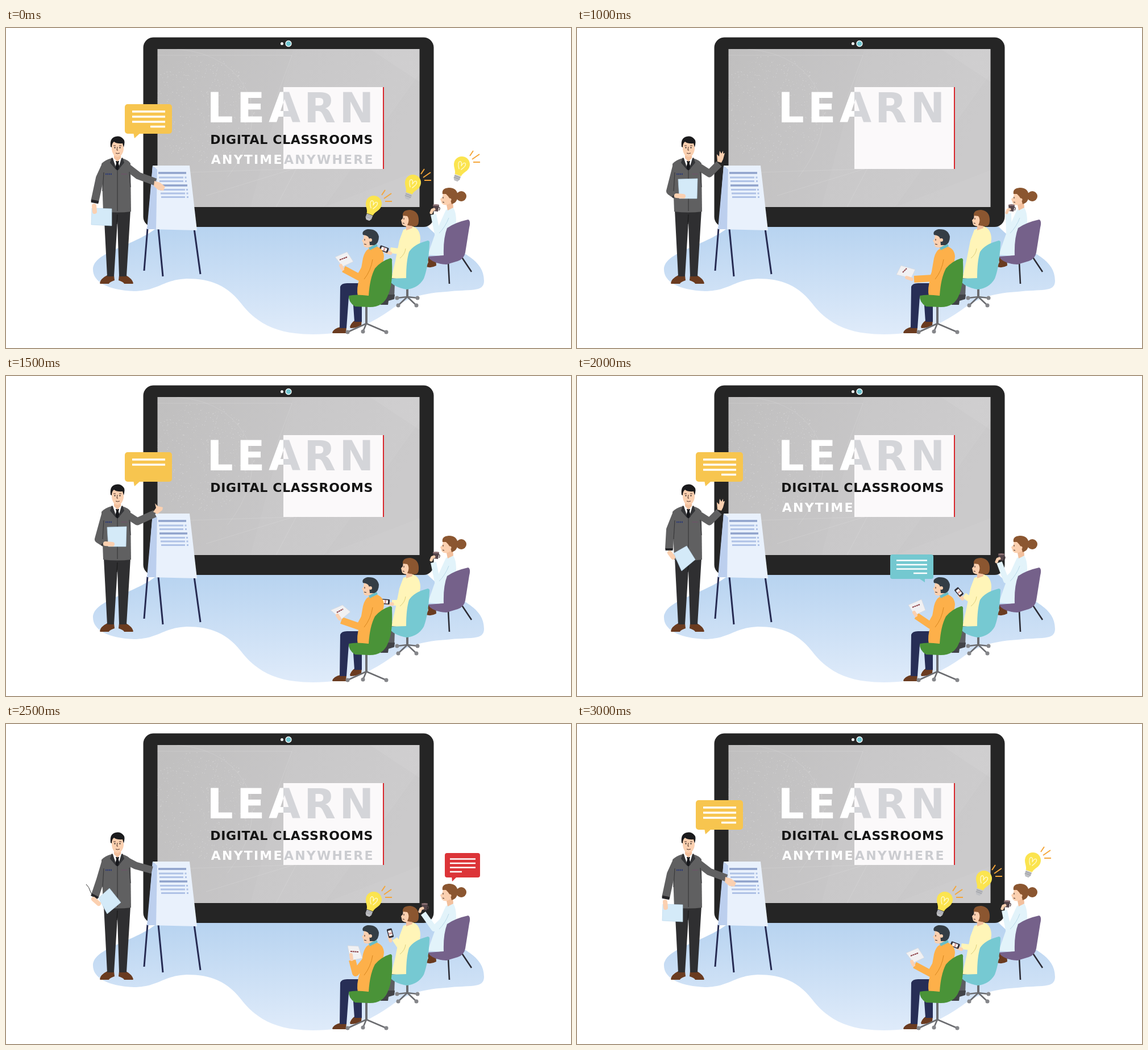
An HTML page for the animation above (3.5 s loop, 994 by 563 pixels).

```html
<!DOCTYPE html>
<html lang="en">
<head>
<meta charset="utf-8">
<title>Digital classrooms</title>
<style>
html, body { margin: 0; width: 100%; height: 100%; overflow: hidden; background: #fff }
svg { display: block }
text { font-family: "DejaVu Sans", Verdana, sans-serif; font-weight: 700 }
.line { fill: none; stroke-linejoin: round }
.round { stroke-linecap: round }
.skin { stroke: #fbd0b0 }
</style>
</head>
<body>
<svg width="994" height="563" viewBox="0 0 994 563">
<defs>
  <linearGradient id="floor" x2="0" y2="1"><stop stop-color="#b7d3f0"/><stop offset="1" stop-color="#dfebfa"/></linearGradient>
  <linearGradient id="wall" x2="1" y2=".25"><stop stop-color="#c0bfbf"/><stop offset=".55" stop-color="#c7c6c7"/><stop offset="1" stop-color="#cbcacb"/></linearGradient>
  <clipPath id="screen"><path d="M266.500 37H727.500V315H266.500Z"/></clipPath>
  <clipPath id="west"><path d="M266 37H488V315H266Z"/></clipPath>
  <clipPath id="east"><path d="M488 37H728V315H488Z"/></clipPath>
  <text id="learn" x="353.600" y="166" font-size="72.500" letter-spacing="6.300">LEARN</text>
  <g id="bulb">
    <g transform="rotate(20)">
      <path d="M-6 20C-6 13 -14 9 -14 0A14 14 0 0 1 14 0C14 9 6 13 6 20Z" fill="#fbe44f"/>
      <path class="line round" d="M-2 9Q-9 -1 -5 -4Q-1 -5 0 3Q1 -5 5 -4Q9 -1 2 9" stroke="#fffbd0" stroke-width="1.3"/>
      <path d="M-5.500 20.500H5.500V27L3 31H-3L-5.500 27Z" fill="#bfc0c4"/>
      <path d="M-5.500 23H5.500M-5.500 26H5.500" stroke="#96989d" stroke-width=".9"/>
    </g>
    <path class="line" d="M14 -15L20 -24M18 -9L31 -18M20 -4L32 -4" stroke="#f5a63a" stroke-width="2"/>
  </g>
</defs>

<path fill="url(#floor)" d="M153 425C153 393 225 385 270 348H740C785 395 841 399 841 445C841 466 815 459 775 464C725 467 702 478 678 495C650 514 615 539 540 539C480 539 445 522 418 490C390 452 360 441 318 441C275 443 270 462 225 463C178 461 153 446 153 425Z"/>

<!-- tablet -->
<rect x="241.500" y="16.500" width="511" height="333.500" rx="18" fill="#252525"/>
<circle cx="485.500" cy="27.500" r="2.500" fill="#fff"/>
<circle cx="497" cy="27.500" r="5" fill="#6fc5d0" stroke="#fff" stroke-width="1.300"/>
<g clip-path="url(#screen)">
  <path d="M266 37H728V315H266Z" fill="url(#wall)"/>
  <path d="M505 37H728V80L560 315H430L480 130Z" fill="#fff" opacity=".03"/>
  <path d="M640 37L728 95V37Z" fill="#fff" opacity=".05"/>
  <path d="M560 315L728 250V315Z" fill="#fff" opacity=".04"/>
  <g id="globe" fill="#fff" opacity=".3"></g>
  <path class="line" d="M266 48H503L476 122M290 255L507 248M352 295L590 222M475 315L512 245M300 37Q400 45 430 125Q445 190 390 262" stroke="#fff" stroke-width=".8" opacity=".16"/>
</g>
<path d="M488 104H664V248H488Z" fill="#fbf9fa"/>
<path d="M664 104V248" stroke="#d9272d" stroke-width="2"/>
<use href="#learn" fill="#fff" clip-path="url(#west)"/>
<use href="#learn" fill="#d4d5d9" clip-path="url(#east)"/>
<text data-on="0234" x="359.200" y="203.500" font-size="22" letter-spacing=".68" fill="#141414">DIGITAL CLASSROOMS</text>
<g font-size="22" letter-spacing="2.200">
  <text data-on="034" x="360.800" y="239" fill="#fff">ANYTIME</text>
  <text data-on="04" x="489" y="239" fill="#cbccd0">ANYWHERE</text>
</g>

<!-- flip chart -->
<path class="line" d="M249 353L243 427M268 353L276 437M331 353L342 433" stroke="#262b52" stroke-width="3"/>
<path d="M258 242H323L336 356L249 354Z" fill="#e9f1fc"/>
<path d="M258 242L266 249L264 354L248 354Z" fill="#bccfee"/>
<path d="M268 255H317M270 277H319" stroke="#8fa2cb" stroke-width="3.400"/>
<path d="M269 263H312M314.500 263H317.500M270 269.500H312M315 269.500H318M271 284.500H315M317 284.500H320M272 291H315M317.500 291H320.500M273 297.500H315M318 297.500H321" stroke="#afc2e6" stroke-width="3"/>

<!-- presenter -->
<path d="M165 449Q166 441 178 435H190L191 444Q182 447 181 450H166ZM224 449Q222 441 211 435H199L198 444Q207 447 208 450H223Z" fill="#6a3b20"/>
<path d="M172 320H219L212 437H199L196 340L190 437H178Z" fill="#2f2f31"/>
<path d="M196 328L195 345" stroke="#151515"/>
<path class="line" data-d="armL" stroke="#606061" stroke-width="14"/>
<path class="line" data-d="cuffL" stroke="#252528" stroke-width="13"/>
<path class="line" data-d="armR" stroke="#606061" stroke-width="13"/>
<path d="M186 229H204Q215 232 219 238L220 323Q196 326 171 323L168 239Q174 232 186 229Z" fill="#606061"/>
<path class="line" d="M172 254L170 287M217 253L219 280M196 248V322" stroke="#39393b" stroke-width="1.200"/>
<path d="M187 228L196 251L205 228Z" fill="#fff"/>
<path d="M193 234H199L198 238L200 247L196 251L192 247L194 238Z" fill="#17181c"/>
<path d="M186 228L183 237L194 250L188 229ZM205 228L208 237L197 250L203 229Z" fill="#333437"/>
<path d="M175 257H186" stroke="#2d3b75" stroke-width="2.500" stroke-dasharray="2 1"/>
<path d="M203 257H213" stroke="#6d5268" stroke-width="2" stroke-dasharray="2 1"/>
<path d="M190 218H202V229L196 235L190 229Z" fill="#f3c09d"/>
<path d="M186 202Q196 195 206 202L207 213Q206 225 196 227Q187 225 186 213Z" fill="#fbd0b0"/>
<path d="M184 209Q182 193 193 191Q201 189 207 196Q210 199 207 210L205 203Q195 204 190 200Q186 203 186 210Z" fill="#1b1b1d"/>
<path class="line" d="M189 207H193M199 207H203M196 209L195 215H197M193 220Q196 222 200 220" stroke="#4d3028" stroke-width="1"/>
<path d="M190.500 210.500H192.500M199.500 210.500H201.500" stroke="#222" stroke-width="2"/>
<path data-d="sheet" fill="#d4eaf8" stroke="#bcd9ed" stroke-width=".7"/>
<path class="line round skin" data-d="handL" stroke-width="8"/>
<path data-d="handR" fill="#fbd0b0"/>
<path data-on="4" class="line" d="M141 282Q146 286 149 296L154 304" stroke="#333" stroke-width="1"/>

<!-- listener with mug -->
<path class="line" d="M778 412L780 450M801 402L819 429" stroke="#2c2c35" stroke-width="2.600"/>
<path d="M741 403H756L757 418Q748 423 739 420L743 412Z" fill="#6a3b20"/>
<path d="M774 320L786 315Q793 323 792 350L776 402L742 399L755 362Z" fill="#e2f3fa"/>
<path class="line" data-d="armBlue" stroke="#e2f3fa" stroke-width="10"/>
<path class="line" d="M779 334Q773 350 762 361" stroke="#b9d9e8"/>
<path d="M774 306L786 304L787 316L777 321Z" fill="#f3c09d"/>
<path d="M769 287L784 286L785 306Q774 315 767 309L764 301L768 297Z" fill="#fbd0b0"/>
<circle cx="801" cy="296" r="9" fill="#8b5630"/>
<path d="M768 292Q766 282 779 281Q795 281 795 297Q793 308 784 310Q782 299 774 292Z" fill="#8b5630"/>
<circle cx="781" cy="302" r="2.500" fill="#fbd0b0"/>
<path d="M769 297V300M768 306L771 307" stroke="#3b2620"/>
<g data-move="mug">
  <path class="line" d="M4 -2Q9 -2 6 4" stroke="#55454a" stroke-width="1.500"/>
  <path d="M-5 -6L6 -5L4 6L-4 5Z" fill="#55454a"/>
  <ellipse cx=".5" cy="-5.500" rx="5.500" ry="1.500" fill="#8d7275"/>
  <path class="line round skin" d="M-8 8L-6 3L-3 2" stroke-width="5"/>
</g>
<path d="M813 337Q818 339 815 351L808 395Q806 406 795 410L775 416Q750 415 742 402L770 400Q769 370 776 352Q790 342 813 337Z" fill="#75618a"/>

<!-- listener with phone -->
<path d="M673 434H706L684 448L683 476H671Z" fill="#5c5e62"/>
<path d="M671 469H684L683 477L673 480L672 487H659Q658 481 668 477Z" fill="#424348"/>
<path d="M699 355L716 349Q729 354 729 372L722 420L706 443L678 440L685 410L692 374Z" fill="#fff5b8"/>
<path class="line" data-d="armYellow" stroke="#fff5b8" stroke-width="10"/>
<path class="line" d="M703 388Q702 398 693 405" stroke="#dccd7c"/>
<path d="M704 341L715 341L715 352L704 356Z" fill="#f3c09d"/>
<path d="M699 327L714 326L713 344Q705 353 697 346L695 338L698 335Z" fill="#fbd0b0"/>
<path d="M698 330Q697 320 711 320Q727 322 726 340Q726 349 718 349L706 347Q711 337 706 331Z" fill="#8b5630"/>
<path d="M700 334V337M698 343L701 344" stroke="#3b2620"/>
<g data-move="phone" data-on="0234">
  <path class="line round skin" d="M5 3L13 3" stroke-width="6"/>
  <rect x="-8" y="-4.500" width="16" height="9" rx="1.500" fill="#302d36"/>
  <path d="M-5 -3H5V3H-5Z" fill="#fff"/>
  <path d="M-1 -3H2V3H-1Z" fill="#d9a39f"/>
</g>
<g id="wheelsTeal"></g>
<path d="M742 374Q746 374 745 380Q743 420 735 441Q725 458 705 460Q680 456 672 441L704 440Q704 410 709 394Q718 380 742 374Z" fill="#76c9d2"/>

<!-- listener with booklet -->
<path d="M574 536Q576 529 588 526H599L598 537H575ZM605 526Q607 519 614 514H626L625 523Q617 528 606 528Z" fill="#6a3b20"/>
<path d="M588 455Q590 449 600 449H638V473H626L626 517H613L610 473H603L599 528H587Z" fill="#272e56"/>
<path d="M639 388L651 384Q664 388 665 402L660 440L642 474L619 472Q616 458 622 440L628 405Q631 392 639 388Z" fill="#fdb04a"/>
<path class="line" data-d="armOrange" stroke="#fdb04a" stroke-width="12"/>
<path class="line" d="M645 407Q642 427 630 442" stroke="#d98820"/>
<path d="M634 374H649L651 386L638 389Z" fill="#f3c09d"/>
<path d="M638 386L652 380L654 384L640 391Z" fill="#69bec7"/>
<path d="M630 362L646 361L646 381Q639 389 630 385L628 377L626 374L629 371Z" fill="#fbd0b0"/>
<path d="M628 364Q625 357 636 354Q653 353 656 367Q656 379 648 382H640L639 371Q638 365 628 364Z" fill="#343d45"/>
<circle cx="641" cy="373" r="3" fill="#fbd0b0"/>
<path d="M631 371V374M630 380L634 381" stroke="#3b2620"/>
<path data-d="booklet" fill="#f1f1f3" stroke="#d6d7dc" stroke-width=".7"/>
<path data-d="print" stroke="#8d4248" stroke-width="2" stroke-dasharray="3 .7"/>
<path class="line round skin" data-d="handOrange" stroke-width="6"/>
<g id="wheelsGreen"></g>
<path d="M676 405Q680 405 679 411Q681 450 672 470Q664 491 640 491L614 490Q602 482 603 471Q615 468 638 471Q640 440 649 423Q660 410 676 405Z" fill="#4a9338"/>

<!-- ideas and speech -->
<use data-on="04" href="#bulb" x="647" y="309"/>
<use data-on="0" href="#bulb" x="716" y="272"/>
<use data-on="0" href="#bulb" x="802" y="240"/>
<g data-on="023">
  <path d="M224 184L226 194L236 185Z" fill="#f7c54f"/>
  <rect x="209" y="134" width="83" height="52" rx="5" fill="#f7c54f"/>
  <path d="M222 147H280M222 156H280" stroke="#fff" stroke-width="3.400"/>
  <path data-on="03" d="M222 165H280M254 173.500H280" stroke="#fff" stroke-width="3.400"/>
</g>
<g data-on="3">
  <path d="M600 355L612 363V355Z" fill="#74c8d0"/>
  <rect x="551" y="314" width="76" height="43" rx="4" fill="#74c8d0"/>
  <path d="M562 324.500H616M562 332H616M562 339.500H616M592 347H616" stroke="#fff" stroke-width="2.600"/>
</g>
<g data-on="4">
  <path d="M784 268L785 277L794 268Z" fill="#dc3438"/>
  <rect x="772" y="227" width="62" height="43" rx="4" fill="#dc3438"/>
  <path d="M781 237.500H826M781 245H826M781 252.500H826M781 260H802" stroke="#fff" stroke-width="2.400"/>
</g>
</svg>
<script>
const $ = id => document.getElementById(id);

// Five poses per moving part; pose 0 is the resting one.
const shapes = {
  armL: ['M176 240L165 264L156 306', 'M176 240L164 287L174 294', 'M176 240L163 287L174 294', 'M176 240L164 270L162 305', 'M176 240L166 274L156 304'],
  cuffL: ['M156.800 303L155.800 308', 'M171 292L174 294', 'M171 292L174 294', 'M162 303L162 307', 'M157 301L155 305'],
  armR: ['M211 243L233 260L263 271', 'M211 242L233 256L250 239', 'M211 243L231 256L262 242', 'M211 242L233 256L250 239', 'M211 240L228 249L257 257'],
  sheet: ['M151 317L186 318L186 348L150 346Z', 'M178 266L212 265L211 300L180 300Z', 'M178 266L212 265L211 300L180 300Z', 'M170 312L193 299L208 323L184 343Z', 'M163 306L182 289L202 314L178 334Z'],
  handL: ['M155 313L156 323', 'M175 295L187 296', 'M175 295L187 296', 'M163 311L169 319', 'M154 308L163 316'],
  handR: ['M261 269L271 272L280 279L277 286L268 285L260 278Z',
    'M247 235L246 222L250 226L251 216L254 221L257 216L257 221L260 220L257 231L254 237Z',
    'M259 239L264 232L262 224L267 229L276 231L275 236L266 243Z',
    'M247 235L246 222L250 226L251 216L254 221L257 216L257 221L260 220L257 231L254 237Z', 'M0 0'],
  armBlue: ['M782 332L759 362L752 328', 'M782 332L760 362L759 326', 'M782 332L759 362L752 328', 'M782 332L755 360L743 328', 'M782 332L753 360L734 333'],
  armYellow: ['M705 368L692 393L676 391', 'M705 368L698 400L692 420', 'M705 368L691 399L679 399', 'M705 368L693 394L681 386', 'M705 368L692 390L684 378'],
  armOrange: ['M643 402L622 439L594 424', 'M643 402L626 440L593 442', 'M643 402L622 441L590 430', 'M643 402L622 439L597 422', 'M643 402L615 438L609 415'],
  booklet: ['M579 403L600 394L611 411L592 420Z', 'M570 418L595 425L588 440L562 434Z', 'M571 412L592 403L606 415L590 428Z', 'M583 403L606 393L613 412L594 421Z', 'M601 390L620 391L627 412L606 416Z'],
  print: ['M587 408L600 403', 'M573 430L580 423', 'M582 416L593 410', 'M590 407L603 402', 'M606 400L620 401'],
  handOrange: ['M589 418L592 424', 'M580 439L589 442', 'M583 421L587 427', 'M593 416L596 421', 'M607 406L608 414']
};
const places = {
  mug: [[756, 317], [764, 317], [756, 316], [746, 319], [736, 322]],
  phone: [[665, 389, 20], [690, 400, 0], [667, 397, 5], [672, 380, 50], [676, 368, 75]]
};

// Star base of a swivel chair: hub, post top, then feet.
function wheels(id, x, top, y, feet) {
  $(id).innerHTML = `<path d="M${x} ${top}V${y}" stroke="#6b6c70" stroke-width="4"/>` + feet.map(([fx, fy]) =>
    `<path d="M${x} ${y}L${fx} ${fy}" stroke="#6b6c70" stroke-width="2.6"/>
     <circle cx="${fx}" cy="${fy}" r="3.5" fill="#85868a"/>`).join('');
}
wheels('wheelsGreen', 634, 489, 520, [[601, 535], [628, 534], [669, 535]]);
wheels('wheelsTeal', 706, 458, 473, [[688, 475], [724, 475], [690, 488], [722, 488]]);

// Pale speckled globe on the screen.
let seed = 7;
const rand = () => (seed = seed * 16807 % 2147483647) / 2147483647;
$('globe').innerHTML = Array.from({ length: 600 }, () => {
  const a = rand() * 6.283, r = 95 * Math.sqrt(rand());
  return `<circle cx="${(343 + r * Math.cos(a)).toFixed(1)}" cy="${(143 + r * Math.sin(a)).toFixed(1)}" r="${(.3 + rand() * .5).toFixed(1)}"/>`;
}).join('');

const all = name => document.querySelectorAll(`[data-${name}]`);
let shown = -1;

function show(pose) {
  all('d').forEach(el => el.setAttribute('d', shapes[el.dataset.d][pose]));
  all('on').forEach(el => el.style.display = el.dataset.on.includes(pose) ? '' : 'none');
  all('move').forEach(el => {
    const [x, y, turn = 0] = places[el.dataset.move][pose];
    el.setAttribute('transform', `translate(${x} ${y}) rotate(${turn})`);
  });
}

function tick() {
  const t = performance.now() % 3500;
  const pose = t < 1000 || t >= 3000 ? 0 : Math.floor(t / 500) - 1;
  if (pose !== shown) show(shown = pose);
  requestAnimationFrame(tick);
}
tick();
</script>
</body>
</html>
```
